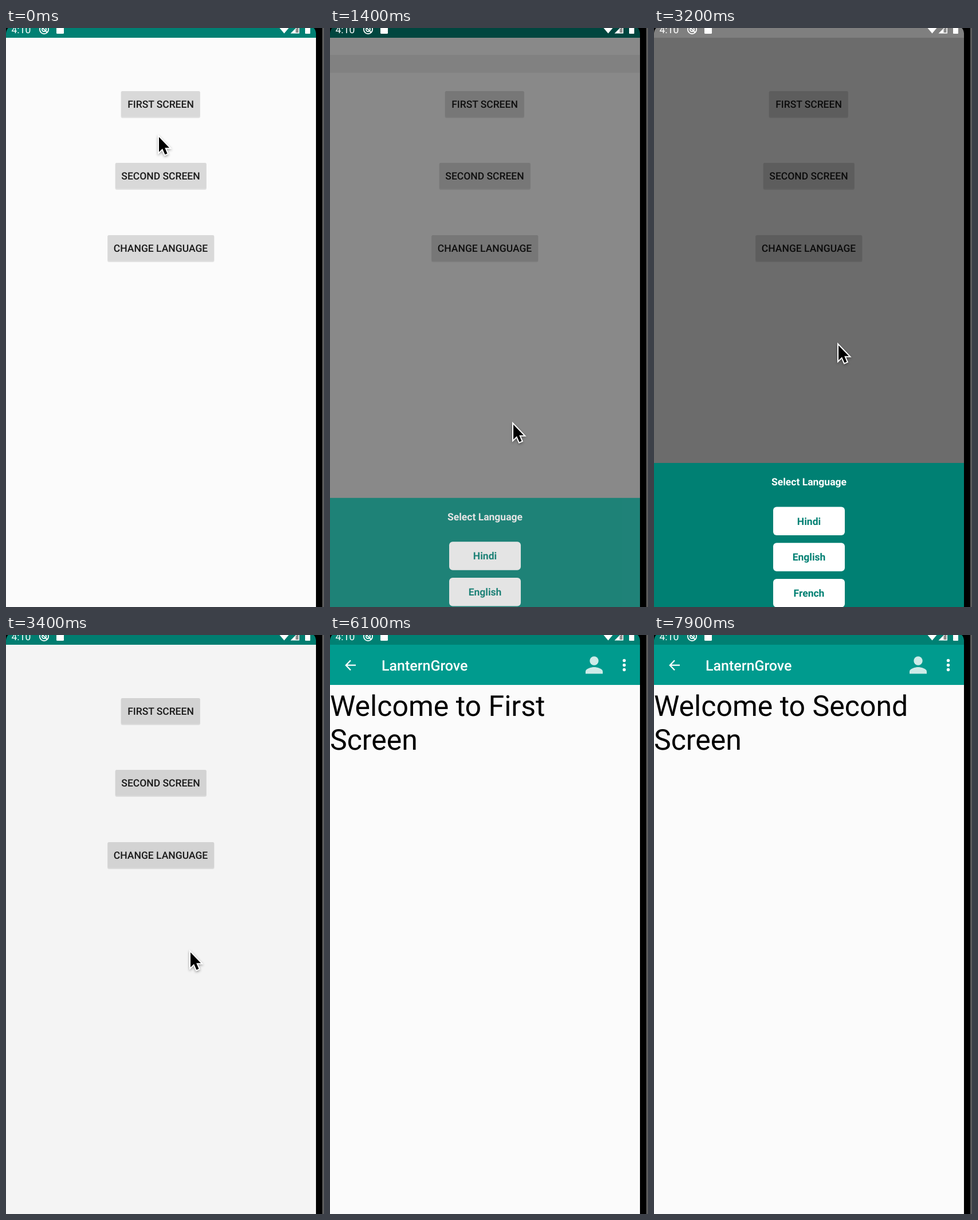
An HTML page for the animation above (8 s loop, 555x1009 px).

```html
<!DOCTYPE html>
<html lang="en">
<head>
<meta charset="utf-8">
<title>Language picker</title>
<style>
  html, body { margin: 0; width: 100%; height: 100%; overflow: hidden; background: #000; }
  svg { display: block; }
  text { font-family: Roboto, sans-serif; text-rendering: geometricPrecision; }
  .label { font-size: 17.5px; font-weight: 500; text-anchor: middle; }
  .bold { font-weight: 700; }
  #cursor { filter: drop-shadow(0 2px 2px rgba(0, 0, 0, .35)); }
</style>
</head>
<body>
<svg width="555" height="1009" viewBox="0 0 555 1009">
  <defs><clipPath id="phone"><rect width="541" height="1009"/></clipPath></defs>
  <rect width="555" height="1009"/>
  <rect x="552" width="3" height="1009" fill="#5c5c5c"/>

  <g clip-path="url(#phone)">
    <g id="main">
      <rect y="-14" width="541" height="1060" fill="#fbfbfb"/>
      <rect y="-14" width="541" height="31" fill="#008073"/>
      <g id="menu"></g>
    </g>
    <rect id="dim" width="541" height="1009"/>
    <g id="dialog">
      <rect y="-14" width="541" height="31" fill="#7f7f7f"/>
      <rect y="758" width="541" height="300" fill="#008073"/>
      <text class="label bold" x="270.5" y="797" fill="#fff">Select Language</text>
      <g id="languages"></g>
    </g>
    <g id="page">
      <rect y="-14" width="541" height="1056" fill="#fbfbfb"/>
      <rect y="-14" width="541" height="31" fill="#008073"/>
      <rect y="17" width="541" height="70" fill="#009b8e"/>
      <rect y="1010" width="541" height="32"/>
      <path d="M45 52.7H28M36 44.2L27.8 52.7L36 61.2" fill="none" stroke="#fff" stroke-width="2.3"/>
      <text x="90" y="61.5" font-size="25" font-weight="500" fill="#fff">LanternGrove</text>
      <g id="actions" fill="#fff">
        <g fill="#cdebe8">
          <circle cx="461" cy="45" r="7.7"/>
          <path d="M446 67.5V63.5C446 58.5 456 56 461 56S476 58.5 476 63.5V67.5Z"/>
        </g>
        <circle cx="513.5" cy="44.5" r="2.7"/>
        <circle cx="513.5" cy="52.5" r="2.7"/>
        <circle cx="513.5" cy="60.5" r="2.7"/>
      </g>
      <g font-size="50">
        <text id="welcome" y="141"></text>
        <text y="199.5">Screen</text>
      </g>
    </g>

    <g fill="#fff">
      <text x="9.5" y="9" font-size="17.5">4:10</text>
      <g fill="none" stroke="#fff" stroke-width="1.8">
        <circle cx="66.5" cy="2.5" r="7.6"/>
        <circle cx="66.5" cy="2.5" r="3.6"/>
        <path d="M62 -2L72 8"/>
      </g>
      <rect x="88" y="-5" width="13" height="15" rx="1.5"/>
      <path d="M475 -3H496L485.5 9.5Z"/>
      <path d="M496.500 9.500L512 -6V9.500Z"/>
      <path d="M505.500 8V2L510.500 -3V8Z" fill="#000" opacity=".45"/>
      <rect x="522" y="-6" width="9" height="16" rx="1"/>
    </g>
    <path d="M0 0H4Q1 2 0 9ZM541 0H537Q540 2 541 9Z"/>
  </g>

  <path id="cursor" d="M0 0V26L6 20.300L10.500 30.500L14.500 28.800L10.200 18.700H18Z"
        stroke="#fff" stroke-width="4" paint-order="stroke"/>
</svg>

<script>
const $ = id => document.getElementById(id);
const LOOP = 8000, STEP = 100;

const menuButton = (label, x, y, w) => `
  <rect x="${x - .5}" y="${y}" width="${w + 1}" height="47" rx="3" opacity=".1"/>
  <rect x="${x}" y="${y}" width="${w}" height="45" rx="2.500" fill="#d9d9d9"/>
  <text class="label" x="270" y="${y + 29}" fill="#1a1a1a">${label}</text>`;
$('menu').innerHTML =
  menuButton('FIRST SCREEN', 201, 110, 137.5) +
  menuButton('SECOND SCREEN', 191, 235, 158.5) +
  menuButton('CHANGE LANGUAGE', 177.5, 361, 185.5);

$('languages').innerHTML = ['Hindi', 'English', 'French'].map((name, i) => {
  const y = 834.5 + i * 62.7;
  return `<rect x="208" y="${y}" width="125" height="49.500" rx="6" fill="#fff"/>
    <text class="label bold" x="270.500" y="${y + 31}" fill="#008073">${name}</text>`;
}).join('');

// Pointer stops: time, x, y
const pointerPath = [
  [0, 267, 190], [400, 255, 380], [500, 255, 380], [600, 255, 382], [850, 255, 382],
  [1250, 320, 691], [1450, 320, 691], [2000, 296, 956], [2600, 290, 880],
  [2800, 290, 880], [3100, 322, 553], [3450, 322, 553], [4000, 275, 130],
  [4150, 275, 130], [4600, 331, 582], [4800, 331, 582], [5500, 115, 1020],
  [6250, 115, 1020], [6500, 150, 938], [7000, 272, 256], [7120, 272, 256],
  [7400, 320, 590], [7500, 320, 590], [7880, 115, 1020], [8000, 115, 1020]
];

const ramp = (t, start, length) => Math.min(1, Math.max(0, (t - start) / length));
const easeOut = u => 1 - (1 - u) ** 3;
const easeInOut = u => (1 - Math.cos(Math.PI * u)) / 2;

function pointerAt(t) {
  const i = pointerPath.findIndex(stop => stop[0] > t);
  const [t0, x0, y0] = pointerPath[i - 1], [t1, x1, y1] = pointerPath[i];
  const u = easeInOut((t - t0) / (t1 - t0));
  return [x0 + (x1 - x0) * u, y0 + (y1 - y0) * u];
}

function zoom(el, scale) {
  el.setAttribute('transform', `translate(270.5 514) scale(${scale}) translate(-270.5 -514)`);
}

function draw(t) {
  const second = t > 7000;
  const open = second
    ? easeOut(ramp(t, 7510, 300))
    : easeOut(ramp(t, 4710, 300)) - easeOut(ramp(t, 6190, 300));
  zoom($('main'), 1 + .05 * open);
  zoom($('page'), .85 + .15 * open);
  $('page').setAttribute('opacity', open);
  $('actions').setAttribute('opacity', t >= (second ? 7700 : 4900) ? 1 : 0);
  $('welcome').textContent = 'Welcome to ' + (second ? 'Second' : 'First');

  const shown = easeInOut(ramp(t, 1240, 250)) - easeInOut(ramp(t, 3200, 200));
  $('dim').setAttribute('opacity', .57 * (ramp(t, 1240, 200) - ramp(t, 3210, 200)));
  $('dialog').setAttribute('opacity', Math.max(0, shown) ** .75);
  $('dialog').setAttribute('transform', `translate(0 ${212 * (1 - shown)})`);

  $('cursor').setAttribute('transform', `translate(${pointerAt(t)})`);
}

function tick() {
  draw(Math.floor(performance.now() % LOOP / STEP) * STEP);
  requestAnimationFrame(tick);
}
tick();
</script>
</body>
</html>
```
